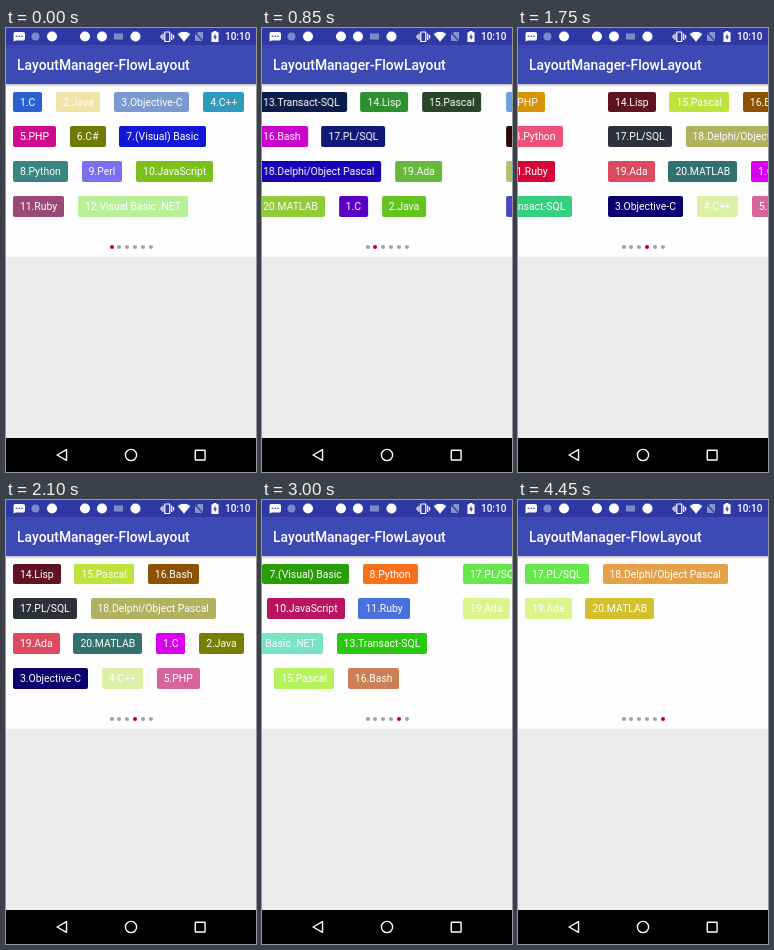
An HTML page for the animation above (5.45 s loop, 250x444 px).

```html
<!DOCTYPE html>
<html lang="en">
<head>
<meta charset="utf-8">
<title>Flow layout pager</title>
<style>
  :root { --dp: calc(250px / 360); }
  html, body { margin: 0; width: 250px; height: 444px; overflow: hidden; }
  body { position: relative; background: #ececec; color: #fff; font-family: Roboto, sans-serif; }
  header {
    position: absolute; inset: 0 0 auto; height: calc(80 * var(--dp)); z-index: 1;
    background: linear-gradient(#3038a4 16.67px, #3e4ab4 0);
    box-shadow: 0 1px 2px rgba(0, 0, 0, .35);
  }
  h1 {
    position: absolute; left: 11.1px; top: 16.67px; margin: 0;
    font: 500 13.89px/41.5px Roboto, sans-serif; white-space: nowrap;
  }
  svg { position: absolute; left: 0; display: block; }
  main {
    position: absolute; left: 0; top: 55.56px; width: 250px; height: 173.6px;
    overflow: hidden; background: #fdfdfd;
  }
  #track { position: absolute; inset: 0; will-change: transform; }
  .page { position: absolute; top: .6px; width: 250px; }
  .row { display: flex; height: calc(50 * var(--dp)); }
  .tag {
    flex: none; height: calc(30 * var(--dp)); margin: calc(10 * var(--dp));
    padding: 0 calc(10 * var(--dp)); box-sizing: border-box; border-radius: 2px;
    font-size: calc(15 * var(--dp)); line-height: calc(30.5 * var(--dp)); white-space: nowrap;
  }
  .dot {
    position: absolute; top: 161.4px; width: 4px; height: 4px;
    border-radius: 50%; background: #a2a2a2;
  }
  .dot.on { background: #c80020; }
</style>
</head>
<body>
<header>
  <svg width="250" height="17" fill="#fff">
    <path d="M9.500 4h7.500a2 2 0 0 1 2 2v4.500a2 2 0 0 1-2 2H10l-2.500 1V6a2 2 0 0 1 2-2z"/>
    <g fill="#3038a4">
      <circle cx="10.500" cy="8.300" r=".8"/><circle cx="13.200" cy="8.300" r=".8"/><circle cx="15.900" cy="8.300" r=".8"/>
    </g>
    <circle cx="29.500" cy="8.500" r="4" opacity=".4"/>
    <circle cx="46" cy="8.500" r="5"/>
    <circle cx="79" cy="8.500" r="5"/>
    <circle cx="96" cy="8.500" r="5"/>
    <rect x="108" y="5.500" width="9" height="6" opacity=".4"/>
    <circle cx="129.500" cy="8.500" r="5"/>
    <g fill="none" stroke="#fff" stroke-width="1.200">
      <rect x="158.800" y="4" width="5" height="9.500" rx=".6"/>
      <path d="M157 5.500v6.500M155.200 7v3.500M165.800 5.500v6.500M167.600 7v3.500"/>
    </g>
    <path d="M171.700 6Q178 1.500 184.300 6L178 13.800z"/>
    <g opacity=".45">
      <path d="M192 4h5v9h-8V7z"/>
      <path d="M188 3.500l10 10.500" stroke="#3038a4" stroke-width="1.200"/>
    </g>
    <path d="M205.500 4.200h2V3h3v1.200h2V14h-7z"/>
    <path d="M209.500 5.500l-2.300 4h1.500v3l2.300-4h-1.500z" fill="#3038a4"/>
    <text x="219" y="12.400" font-family="Roboto, sans-serif" font-size="10" font-weight="500">10:10</text>
  </svg>
  <h1>LayoutManager-FlowLayout</h1>
</header>
<main><div id="track"></div></main>
<svg width="250" height="34" style="top:410px;background:#000" fill="none" stroke="#fff" stroke-width="1.400">
  <path d="M60.500 11.700v10.600L51 17z" stroke-linejoin="round"/>
  <circle cx="125" cy="17" r="5.600"/>
  <rect x="189.300" y="12.200" width="9.800" height="9.800" rx=".4"/>
</svg>
<script>
  const WIDTH = 250, LOOP = 5450, STEP = 50;
  const languages = ['C', 'Java', 'Objective-C', 'C++', 'PHP', 'C#', '(Visual) Basic',
    'Python', 'Perl', 'JavaScript', 'Ruby', 'Visual Basic .NET', 'Transact-SQL', 'Lisp',
    'Pascal', 'Bash', 'PL/SQL', 'Delphi/Object Pascal', 'Ada', 'MATLAB'];

  // Tag colours: one string per row
  const pages = [
    ['2a60d0 f0e4a6 7b9ad0 2f9abb', 'd00a8c 6f7a00 1018d8', '3a8582 7a6ff0 7bc01c', '9a4876 b8f09a'],
    ['0a1c4a 2c8f30 294426', 'cc00cc 10187a', '1a00b4 66b83c', '8fcc38 5a00c4 62c41c'],
    ['6b9fe0 d9cf82 d89408', '2b0808 dd0030 ee5078', 'adc266 46a800 d40838', '4846c2 36cf80'],
    ['5e1222 bde33c 8c5200', '2d3038 b0b262', 'dc4a60 337070 da00f0 787e00', '0c006e dcf0a8 d8649c'],
    ['35c482 2a9c08 f8701a', '201464 b81462 4a70dc', '78e4c4 2bc810', '800088 b6f25c cc8058'],
    ['66e84c e6a04a', 'dcf48c d4c02c']
  ];

  // Swipes: start, end, strength of the slowdown
  const swipes = [[0, 750, 4.1], [800, 1500, 4.1], [1500, 2100, 4.1], [2150, 2800, 5.4], [2900, 3450, 4.1]];

  const track = document.getElementById('track');

  function add(parent, className, text = '') {
    const el = document.createElement('div');
    el.className = className;
    el.textContent = text;
    return parent.appendChild(el);
  }

  let count = 0;
  pages.forEach((rows, p) => {
    const page = add(track, 'page');
    page.style.left = p * WIDTH + 'px';
    for (const colours of rows) {
      const row = add(page, 'row');
      for (const colour of colours.split(' ')) {
        const i = count++ % languages.length;
        add(row, 'tag', `${i + 1}.${languages[i]}`).style.background = '#' + colour;
      }
    }
  });

  const dots = pages.map((_, i) => {
    const dot = add(track.parentNode, 'dot');
    dot.style.left = 103.5 + i * 7.85 + 'px';
    return dot;
  });

  function progress(t, [start, end, power]) {
    const x = Math.min(1, Math.max(0, (t - start) / (end - start)));
    return 1 - (1 - x ** 1.65) ** power;
  }

  function draw(time) {
    const t = Math.floor((time % LOOP) / STEP) * STEP;
    const position = swipes.reduce((sum, swipe) => sum + progress(t, swipe), 0);
    track.style.transform = `translateX(${-position * WIDTH}px)`;
    dots.forEach((dot, i) => dot.classList.toggle('on', i === Math.round(position)));
  }

  const begin = performance.now();
  function tick() {
    draw(performance.now() - begin);
    requestAnimationFrame(tick);
  }
  tick();
</script>
</body>
</html>
```
